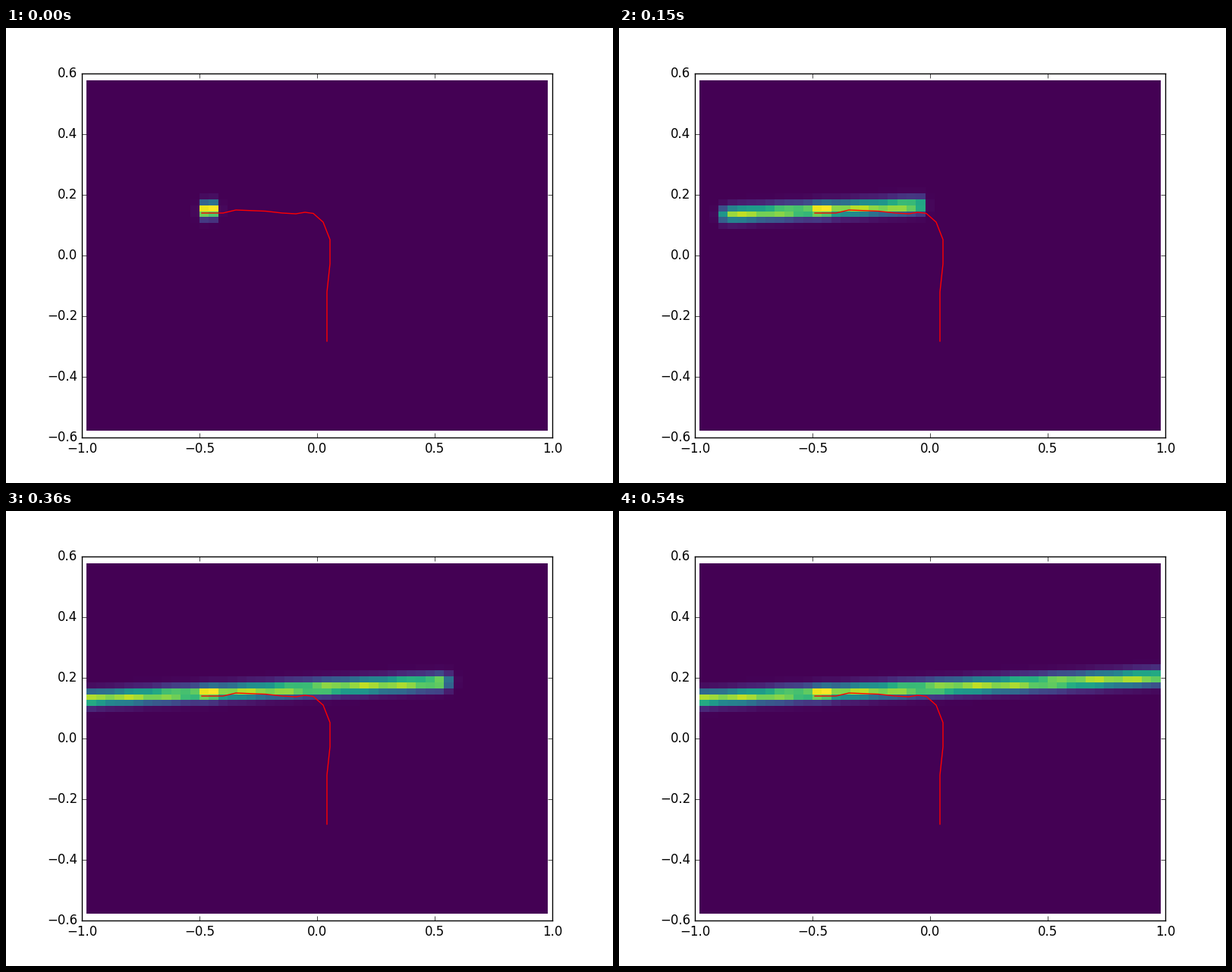
Write a matplotlib script that moves like this. It is 800 by 600 pixels and loops after 720 ms.

```python
import numpy as np
import matplotlib.pyplot as plt
from matplotlib.animation import FuncAnimation

plt.style.use("classic")
plt.rcParams["font.family"] = "DejaVu Sans"

COLS, ROWS = 49, 59
STEPS, FRAMES, INTERVAL = 18, 24, 30
START = 12.5   # column where both fronts begin
SIGMA = 0.87   # half width of the ridge, in rows

# Key points of the red path, in stage pixels
PATH = [(258, 244), (286, 244), (303, 240), (342, 241.5), (364, 244),
        (382, 245), (394, 243), (405, 244.5), (418, 256), (427, 279),
        (427, 311), (423, 348), (423, 413)]


def to_data(x, y):
    return (x - 410) / 310, (300 - y) / 400


def bell(x, width):
    return np.exp(-x ** 2 / (2 * width ** 2))


# A gently tilted ridge that ripples along its length and peaks at the start
cols = np.arange(COLS)
rows = np.arange(ROWS)[:, None]
center = 22.22 - 0.074 * cols
ripple = 0.05 * np.cos(2 * np.pi * (cols - START) / 4.15)
level = 0.86 + ripple + 0.2 * bell(cols - START, 0.65)
ridge = level * bell(rows - center, SIGMA)


def density(step):
    """Ridge revealed by two fronts that run outwards from the start."""
    left = START - 0.5 - 1.93 * step
    right = START + 1.5 + 1.93 * step + 0.009 * step ** 2
    cover = np.minimum(right - cols, cols + 1 - left)
    halo = np.where(cover > -1, 0.025, 0)
    grid = ridge * np.maximum(np.clip(cover, 0, 1), halo)
    return grid / grid.max()


fig = plt.figure(figsize=(8, 6), dpi=100, facecolor="white")
ax = fig.add_axes([0.125, 0.1, 0.775, 0.8])

x_edges = np.linspace(-0.98, 0.98, COLS + 1)
_, y_edges = to_data(0, np.linspace(69.3, 531.3, ROWS + 1))
mesh = ax.pcolormesh(x_edges, y_edges, density(0), cmap="viridis",
                     vmin=0, vmax=1, zorder=1)
ax.plot(*to_data(*np.array(PATH).T), color="red", lw=1, zorder=2)

ax.set_xlim(-1, 1)
ax.set_ylim(-0.6, 0.6)
ax.set_xticks(np.linspace(-1, 1, 5))
ax.set_yticks(np.linspace(-0.6, 0.6, 7))


def update(i):
    mesh.set_array(density(min(i, STEPS)))
    return [mesh]


anim = FuncAnimation(fig, update, frames=FRAMES, interval=INTERVAL,
                     repeat=True, repeat_delay=0, blit=False)
plt.show()
```
